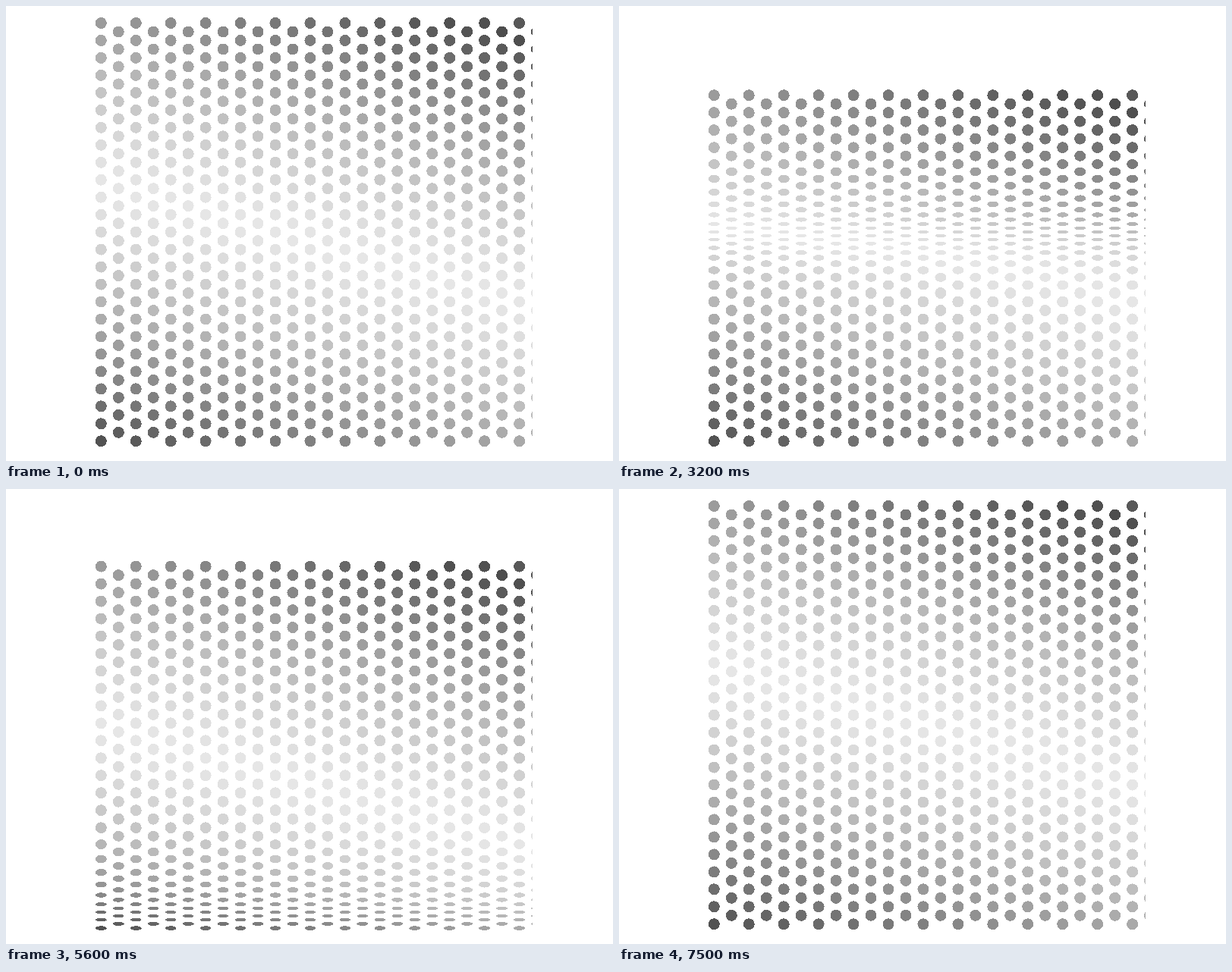
Animation of 800 by 600 pixels, one loop 7.6 s. Source, as an HTML page:

```html
<!DOCTYPE html>
<html lang="en">
<head>
<meta charset="utf-8">
<title>Compression pulse</title>
<style>
  html, body { margin: 0; width: 100%; height: 100%; overflow: hidden; background: #fff; }
  svg { display: block; width: 100%; height: 100%; }
</style>
</head>
<body>
<svg id="stage" viewBox="0 0 800 600" shape-rendering="crispEdges">
  <clipPath id="edge"><rect width="694" height="600"/></clipPath>
  <g id="dots" clip-path="url(#edge)"></g>
</svg>
<script>
const NS = 'http://www.w3.org/2000/svg';
const LOOP = 7600, STEP = 100;
const PITCH = 22.97, LEFT = 125.3, TOP = 22.5, R = 7.5;
const ROWS = 49, COLS = 26;

// Total squeeze, in px, once the pulse has advanced 0, 2, 4, ... half rows past a point
const SQUEEZE = [0, 1, 4.4, 10.9, 20.9, 32.8, 45.8, 58.3, 69.2, 78.2, 85.2, 90.6, 94.1, 95.2];
const LAST = SQUEEZE.length - 1;
const knot = i => SQUEEZE[Math.max(0, Math.min(LAST, i))];

function squeeze(q) {
  if (q <= 1) return 0;
  if (q >= 2 * LAST) return SQUEEZE[LAST];
  const i = q >> 1;
  if (q % 2 === 0) return knot(i);
  return (9 * (knot(i) + knot(i + 1)) - knot(i - 1) - knot(i + 2)) / 16;
}

function flatness(q) {
  if (q <= 1) return 1;
  const scale = 1 - (squeeze(q + 1) - squeeze(q - 1)) / PITCH;
  return Math.pow(scale, 1.5);
}

// Grey falls off on both sides of a slanted light band and folds back at the dark end
function shade(x, y) {
  const d = Math.abs(y - 0.28 * x - 200) / 348;
  const fold = d > 1 ? 2 - d : d;
  const v = Math.round(230 - 154 * Math.pow(fold, 1.45));
  return `rgb(${v},${v},${v})`;
}

const layer = document.getElementById('dots');
const rows = [];
for (let j = 0; j < ROWS; j++) {
  const y = TOP + j * PITCH / 2;
  const row = { y, dots: [] };
  for (let i = j % 2; i < COLS; i += 2) {
    const x = LEFT + i * PITCH;
    const dot = document.createElementNS(NS, 'ellipse');
    dot.setAttribute('cx', x);
    dot.setAttribute('rx', R);
    dot.setAttribute('fill', shade(x, y));
    layer.appendChild(dot);
    row.dots.push(dot);
  }
  rows.push(row);
}

function draw(n) {
  const wall = squeeze(n - ROWS);
  rows.forEach((row, j) => {
    const q = n - j;
    const cy = row.y + squeeze(q) - wall;
    const ry = R * flatness(q);
    for (const dot of row.dots) {
      dot.setAttribute('cy', cy);
      dot.setAttribute('ry', ry);
    }
  });
}

let shown = -1;
function tick() {
  const n = Math.floor(performance.now() % LOOP / STEP);
  if (n !== shown) draw(shown = n);
  requestAnimationFrame(tick);
}
tick();
</script>
</body>
</html>
```
